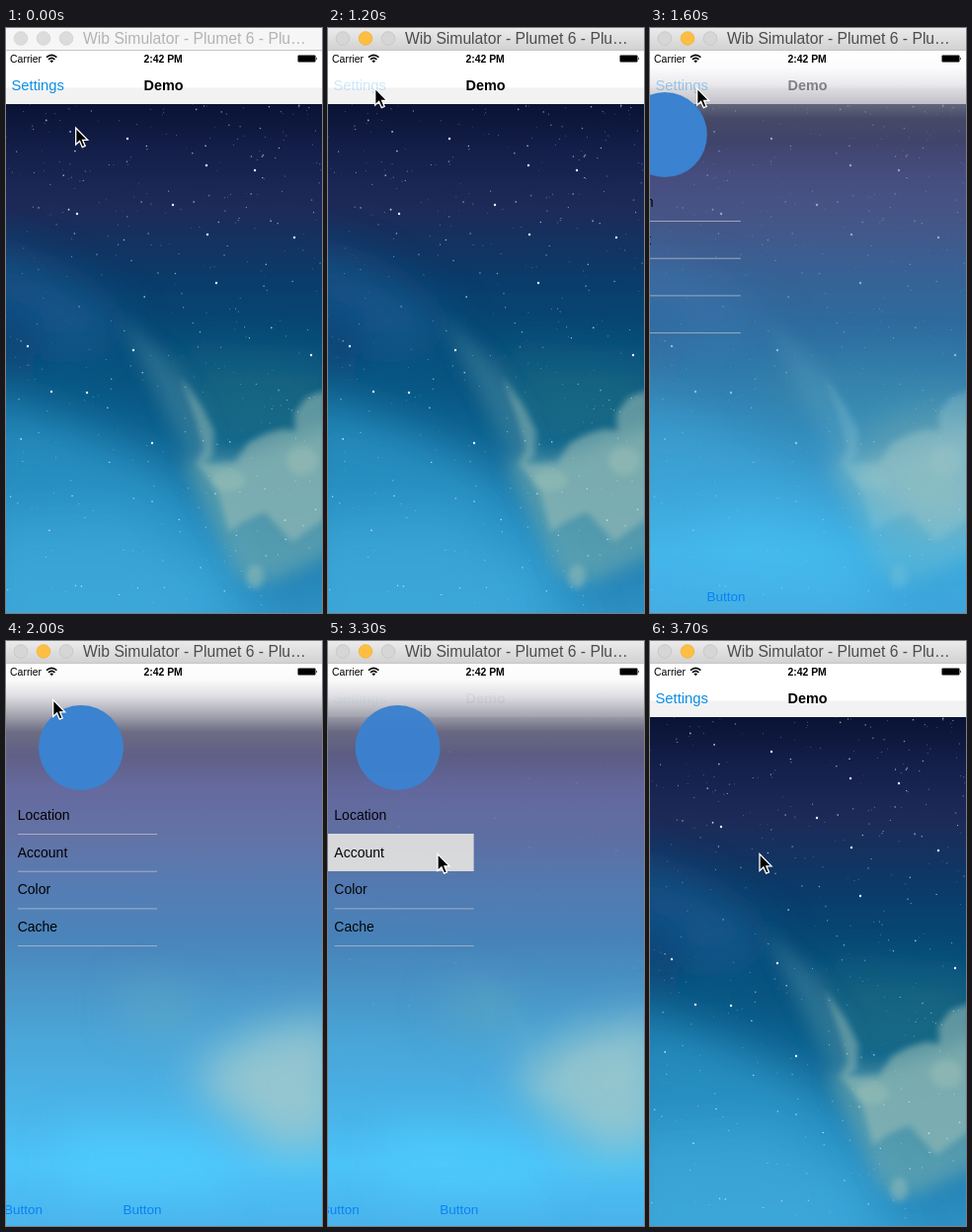
An HTML page that plays this animation: 320x592 px, repeating every 3800 ms.

```html
<!DOCTYPE html>
<html lang="en">
<head>
<meta charset="utf-8">
<title>Settings drawer</title>
<style>
html, body { margin: 0; width: 100%; height: 100%; overflow: hidden; background: #fff; }
svg { display: block; width: 100vw; height: 100vh; }
text { font-family: "Liberation Sans", Arial, sans-serif; white-space: pre; }
</style>
</head>
<body>
<svg viewBox="0 0 320 592">
  <defs>
    <linearGradient id="sky" gradientUnits="userSpaceOnUse" x1="0" y1="77" x2="0" y2="592"></linearGradient>
    <linearGradient id="glass" gradientUnits="userSpaceOnUse" x1="0" y1="22" x2="0" y2="592"></linearGradient>
    <linearGradient id="chrome" x2="0" y2="1">
      <stop stop-color="#ebebeb"/><stop offset="1" stop-color="#d2d2d2"/>
    </linearGradient>
    <filter id="soft" x="-50%" y="-50%" width="200%" height="200%"><feGaussianBlur stdDeviation="22"/></filter>
    <filter id="mist" x="-50%" y="-50%" width="200%" height="200%"><feGaussianBlur stdDeviation="9"/></filter>
    <filter id="edge" x="-50%" y="-50%" width="200%" height="200%"><feGaussianBlur stdDeviation="3"/></filter>
    <clipPath id="screen"><path d="M0 23H320V592H0Z"/></clipPath>
    <clipPath id="photo"><path d="M0 77H320V592H0Z"/></clipPath>
  </defs>

  <g clip-path="url(#photo)">
    <path d="M0 77H320V592H0Z" fill="url(#sky)"/>
    <g filter="url(#soft)">
      <path d="M-30 215L60 250 130 300 70 330-30 290Z" fill="#1f6ba3" opacity=".5"/>
      <path d="M-30 370L70 400 150 440 220 500 270 640H-30Z" fill="#37a8dc" opacity=".55"/>
      <path d="M-30 500L120 490 220 560 200 640H-30Z" fill="#4ab6e4" opacity=".4"/>
      <path d="M170 330L330 340V420L210 430Z" fill="#1f7580" opacity=".5"/>
      <path d="M-20 265L40 290 25 350-20 350Z" fill="#0f3a72" opacity=".5"/>
    </g>
    <g filter="url(#mist)">
      <path d="M115 292L165 335 200 385 212 430 190 445 165 395Z" fill="#5e96a8" opacity=".4"/>
      <path d="M180 440L240 432 335 400V530L270 560 235 555Z" fill="#6fa9ae" opacity=".65"/>
    </g>
    <g filter="url(#edge)" fill="#9dc0b6">
      <path d="M176 352L198 383 211 408 209 434 192 444 200 425 192 396Z" opacity=".45"/>
      <path d="M194 441L232 440 245 420 262 411 280 406 293 408 292 390 304 374 325 366V495L290 520 262 490 240 500 226 510 214 468Z" opacity=".55"/>
      <ellipse cx="252" cy="555" rx="9" ry="12" opacity=".5"/>
      <ellipse cx="300" cy="438" rx="16" ry="14" opacity=".5"/>
      <ellipse cx="225" cy="458" rx="17" ry="11" opacity=".45"/>
    </g>
    <g id="stars" fill="#c9e8ff"></g>
  </g>

  <path d="M0 22H320V77H0Z" fill="#fff"/>
  <path d="M0 60.5H320V77H0Z" fill="#f2f2f3"/>
  <text id="back" x="5.5" y="63" font-size="14.8" fill="#0a8fe6">Settings</text>
  <text x="139.5" y="63" font-size="14.4" font-weight="700">Demo</text>

  <g id="veil" clip-path="url(#screen)">
    <path d="M0 22H320V592H0Z" fill="url(#glass)"/>
    <g filter="url(#soft)">
      <path d="M185 440L250 395 340 380V510L270 515Z" fill="#a2cbcd" opacity=".85"/>
      <path d="M60 490L200 500 230 560 60 560Z" fill="#4fcfff" opacity=".6"/>
      <path d="M120 350L200 365 180 395 120 385Z" fill="#67aec2" opacity=".6"/>
    </g>
  </g>

  <g clip-path="url(#screen)">
    <g id="menu">
      <circle cx="76" cy="108" r="43" fill="#3b82d0"/>
      <g id="rows"></g>
      <g font-size="13.5" fill="#0a80f5">
        <text x="-2" y="579.5">Button</text>
        <text x="118.5" y="579.5">Button</text>
      </g>
    </g>
  </g>

  <g>
    <text x="4" y="35" font-size="10.5">Carrier</text>
    <text x="139.5" y="35" font-size="10.4" font-weight="700">2:42 PM</text>
    <g fill="none" stroke="#000" stroke-width="1.6">
      <path d="M41 29.6Q46.2 25 51.4 29.6M43 31.9Q46.2 29 49.4 31.9"/>
    </g>
    <path d="M44.4 33.2Q46.2 31.8 48 33.2L46.2 35.2Z"/>
    <rect x="295.5" y="27.5" width="18" height="7" rx="1"/>
    <path d="M314.2 29.5Q316 31 314.2 32.5Z"/>
  </g>

  <rect id="bar" width="320" height="22"/>
  <path d="M0 22.5H320" stroke="#c6c6c6"/>
  <g id="dots" stroke-width=".8"></g>
  <text id="title" x="78" y="16" font-size="15.7">Wib Simulator - Plumet 6 - Plu…</text>

  <path id="cursor" d="M0 0V17L3.9 13.4 6.6 19.7 9.5 18.4 6.9 12.3H12Z" stroke="#fff" stroke-width="1.3"/>
</svg>
<script>
const LOOP = 3800, STEP = 100;
const $ = id => document.getElementById(id);
const clamp = v => Math.max(0, Math.min(1, v));
const ramp = (t, from, span) => clamp((t - from) / span);
const ease = u => (1 - Math.cos(Math.PI * u)) / 2;

function add(parent, tag, attrs, text) {
  const el = document.createElementNS("http://www.w3.org/2000/svg", tag);
  for (const key in attrs) el.setAttribute(key, attrs[key]);
  if (text) el.textContent = text;
  return parent.appendChild(el);
}

function fillStops(id, top, stops) {
  for (const [y, color] of stops)
    add($(id), "stop", { offset: (y - top) / (592 - top), "stop-color": color });
}
fillStops("sky", 77, [[77, "#0a1334"], [125, "#141f4a"], [180, "#1d2a58"], [215, "#143260"],
  [260, "#093d6b"], [330, "#074f7c"], [400, "#0c5f8c"], [480, "#1a76a6"], [592, "#2d8fc2"]]);
fillStops("glass", 22, [[22, "#fff"], [40, "#fafafb"], [55, "#e0e0e5"], [75, "#a5a5b0"],
  [92, "#6c6c84"], [115, "#605f86"], [150, "#666a9f"], [200, "#6273a6"], [250, "#557db4"],
  [300, "#4a84ba"], [350, "#4b96c8"], [400, "#4ba5d8"], [480, "#4bb6ea"], [530, "#4dc4f8"], [592, "#4bb4ec"]]);

// Star field: seeded scatter plus a few bright ones
let seed = 7;
const rand = () => (seed = seed * 16807 % 2147483647) / 2147483647;
for (let i = 0; i < 420; i++)
  add($("stars"), "circle", {
    cx: 320 * rand(), cy: 77 + 515 * rand() ** 1.35,
    r: 0.4 + 0.5 * rand() ** 3, opacity: 0.3 + 0.6 * rand()
  });
for (const [cx, cy] of [[123, 112], [169, 179], [129, 326], [148, 420], [252, 144], [203, 139], [204, 209],
  [72, 188], [292, 212], [309, 331], [22, 322], [46, 368], [82, 369], [213, 258]])
  add($("stars"), "circle", { cx, cy, r: 1.2, fill: "#eaf8ff" });

const PICKED = 1;
const lines = [];
const rows = $("rows");
const band = add(rows, "rect", { x: 0, y: 195, width: 153, height: 38, fill: "#dcdcdc" });
["Location", "Account", "Color", "Cache"].forEach((name, i) => {
  const y = 195.5 + 37.7 * i;
  lines.push(add(rows, "path", { d: `M12 ${y}H153`, stroke: "#c8c7cc", "stroke-opacity": .7 }));
  add(rows, "text", { x: 11.7, y: y - 14.5, "font-size": 14 }, name);
});

const dots = [15, 38, 61].map(cx => add($("dots"), "circle", { cx, cy: 10.5, r: 6.8 }));

const path = [[0, 70.7, 101], [600, 51.5, 60], [700, 47.7, 61], [1600, 47.7, 61],
  [1900, 47.7, 59.5], [2400, 47.7, 59.5], [3000, 111, 215.5], [LOOP, 111, 215.5]];

function cursorAt(t) {
  const i = path.findIndex(key => key[0] > t);
  const [t0, x0, y0] = path[i - 1], [t1, x1, y1] = path[i];
  const u = ease(ramp(t, t0, t1 - t0));
  return [x0 + (x1 - x0) * u, y0 + (y1 - y0) * u];
}

function draw(t) {
  const active = t >= 1000;
  $("bar").setAttribute("fill", active ? "url(#chrome)" : "#f6f6f6");
  $("title").setAttribute("fill", active ? "#4c4c4c" : "#b3b3b3");
  dots.forEach((dot, i) => {
    const lit = active && i === 1;
    dot.setAttribute("fill", lit ? "#fdbe41" : active ? "#d6d6d6" : "#dcdcdc");
    dot.setAttribute("stroke", lit ? "#f2b33c" : active ? "#c4c4c4" : "#d2d2d2");
  });

  const pressed = t >= 1100 && t < 1300;
  const back = pressed ? .2 : t < 1100 ? 1 : .2 + .8 * ramp(t, 1300, 400);
  $("back").setAttribute("opacity", back);

  const closed = ease(ramp(t, 3246, 450));
  const open = ease(ramp(t, 1346, 450)) - closed;
  $("veil").setAttribute("opacity", open);
  $("menu").setAttribute("transform", `translate(${-153 * (1 - open)} 0)`);
  $("menu").setAttribute("opacity", 1 - .9 * closed);
  $("menu").setAttribute("visibility", open > 0 ? "visible" : "hidden");

  const picked = t >= 3100;
  band.setAttribute("opacity", +picked);
  lines.forEach((line, i) =>
    line.setAttribute("opacity", picked && (i === PICKED || i === PICKED - 1) ? 0 : 1));

  $("cursor").setAttribute("transform", `translate(${cursorAt(t)})`);
}

const start = performance.now();
function tick() {
  const t = (performance.now() - start) % LOOP;
  draw(Math.floor(t / STEP) * STEP);
  requestAnimationFrame(tick);
}
tick();
</script>
</body>
</html>
```
